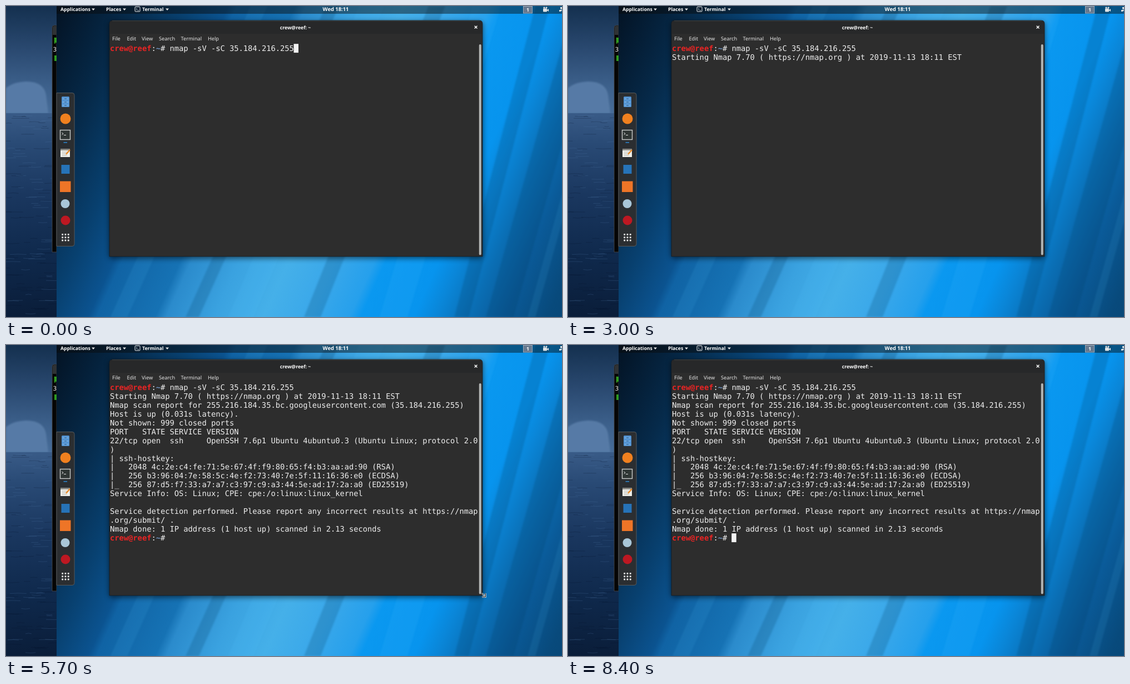
An HTML page that plays this animation: 1000x560 px, repeating every 8500 ms.

```html
<!DOCTYPE html>
<html lang="en">
<head>
<meta charset="utf-8">
<title>Terminal port scan</title>
<style>
html, body { margin: 0; width: 100%; height: 100%; overflow: hidden; background: #000; }
svg { display: block; width: 1000px; height: 560px; }
text { white-space: pre; text-rendering: geometricPrecision; }
.ui { font: 9.2px "Noto Sans", "Open Sans", sans-serif; fill: #e6e6e6; }
.bar { font: bold 8.7px "Noto Sans", "Open Sans", sans-serif; fill: #fff; }
.term { font: 13.74px "DejaVu Sans Mono", monospace; fill: #efefef; }
.host { font-weight: bold; fill: #ec2424; }
.dir { font-weight: bold; fill: #6f93c4; }
</style>
</head>
<body>
<svg id="stage" viewBox="0 0 1000 560" xmlns="http://www.w3.org/2000/svg">
  <defs>
    <linearGradient id="sky" x2="0" y2="1">
      <stop offset="0" stop-color="#14304f"/><stop offset=".4" stop-color="#2a4970"/>
      <stop offset=".75" stop-color="#3d618c"/><stop offset="1" stop-color="#476c98"/>
    </linearGradient>
    <linearGradient id="sea" x2="0" y2="1">
      <stop offset="0" stop-color="#395b87"/><stop offset=".15" stop-color="#294a75"/>
      <stop offset=".4" stop-color="#1a375f"/><stop offset=".7" stop-color="#0f294c"/>
      <stop offset="1" stop-color="#0a1d39"/>
    </linearGradient>
    <linearGradient id="wall" gradientUnits="userSpaceOnUse"></linearGradient>
    <radialGradient id="corner" gradientUnits="userSpaceOnUse" r="1"
      gradientTransform="translate(91 0) scale(740 340)">
      <stop offset="0"/><stop offset=".25" stop-opacity=".96"/>
      <stop offset=".5" stop-opacity=".68"/><stop offset=".75" stop-opacity=".3"/>
      <stop offset="1" stop-opacity="0"/>
    </radialGradient>
    <filter id="soft"><feGaussianBlur stdDeviation="1.5"/></filter>
    <filter id="shade" x="-5%" y="-5%" width="110%" height="112%"><feGaussianBlur stdDeviation="5"/></filter>
    <clipPath id="desk"><rect x="91" width="909" height="560"/></clipPath>
  </defs>

  <!-- desktop behind -->
  <rect width="92" height="194" fill="url(#sky)"/>
  <path d="M0 193V148Q12 137 36 136Q68 136 72 160L76 193Z" fill="#567aa6" filter="url(#soft)"/>
  <rect y="193" width="92" height="367" fill="url(#sea)"/>
  <g id="waves"></g>
  <path d="M91 35H87Q83 35 83 39V443H91Z" fill="#050505" stroke="#4a4a4a" stroke-width=".8"/>
  <path d="M91 36H87Q84 36 84 39V52H91Z" fill="#303234"/>
  <text class="term" x="84" y="66" style="fill:#42b82c;font-size:12px">[</text>
  <rect x="88" y="57" width="3" height="9" fill="#2f9a20"/>
  <text class="term" x="84.5" y="82" style="font-size:11px">3</text>
  <path d="M87 89h4v10h-4z" fill="#2f9a20"/>

  <!-- wallpaper -->
  <g clip-path="url(#desk)">
    <rect x="91" width="909" height="560" fill="url(#wall)"/>
    <g id="bands" filter="url(#soft)"></g>
    <rect x="91" width="909" height="560" fill="url(#corner)"/>
  </g>

  <!-- top panel -->
  <rect x="91" width="909" height="14" fill="#0a0a0a" opacity=".45"/>
  <g id="panel"></g>
  <g fill="none" stroke="#eee">
    <rect x="232" y="1.5" width="9" height="8.5" rx="1"/>
    <path d="M234 4l2 1.7-2 1.7M236.5 8h2.5" stroke-width=".8"/>
  </g>
  <rect x="930.5" y=".5" width="16" height="12.5" fill="#66798f" stroke="#9aa9b9"/>
  <text class="bar" x="938.5" y="9.5" text-anchor="middle">1</text>
  <g fill="#dfe3e6">
    <rect x="966" y="4.5" width="7" height="6" rx="1"/>
    <circle cx="968" cy="3" r="1.6"/><circle cx="972" cy="3" r="1.6"/>
    <path d="M973 7l3-2v5l-3-2z"/>
    <path d="M997 2h3v3h-3zM995 7h3v3h-3zM998 5h1v3h2v1h-3z"/>
  </g>

  <!-- dock -->
  <path d="M91 156.5H119Q123 156.5 123 160.5V428.5Q123 432.5 119 432.5H91Z" fill="#2b2e31" stroke="#55595c"/>
  <rect x="100" y="163" width="14" height="19" rx="1.5" fill="#4d8fd0"/>
  <path d="M101.5 165h11v4h-11zM101.5 171h11v4h-11zM101.5 177h11v4h-11z" fill="#68a3da"/>
  <path d="M105 167h4M105 173h4M105 179h4" stroke="#23568c"/>
  <circle cx="107" cy="203" r="9.5" fill="#f0801f"/>
  <rect x="97.5" y="223.5" width="18" height="17" fill="#2f3634" stroke="#c9ccca" stroke-width="1.4"/>
  <path d="M100.5 228l2.5 2-2.5 2M104 232.5h4" fill="none" stroke="#e8e8e8"/>
  <rect x="103.5" y="245" width="6.5" height="1.6" fill="#2a84cc"/>
  <path d="M98 259h17v13H98z" fill="#efefea"/>
  <path d="M98 257h17v3H98z" fill="#8b8b86"/>
  <path d="M100.5 263h10M100.5 266h8M100.5 269h9" stroke="#b5b5b0"/>
  <path d="M108 267l7-8" stroke="#e98a28" stroke-width="2.4"/>
  <rect x="99.5" y="286" width="15" height="16" fill="#2673b8"/>
  <rect x="97" y="315.5" width="19.5" height="19.5" fill="#ee7527"/>
  <circle cx="106.5" cy="356" r="8" fill="#a9c6d8"/>
  <circle cx="107" cy="386" r="8.5" fill="#bd1822"/>
  <g id="dots" fill="#e8e8e8"></g>

  <!-- terminal window -->
  <rect x="185" y="28" width="673" height="427" rx="6" fill="#000" opacity=".5" filter="url(#shade)"/>
  <path d="M186 451V32Q186 26 192 26H851Q857 26 857 32V451Z" fill="#2d2d2d" stroke="#151b20" stroke-width=".8"/>
  <path d="M186.5 50V32.5Q186.5 26.5 192.5 26.5H850.5Q856.5 26.5 856.5 32.5V50Z" fill="#272829"/>
  <path d="M191 26.7H852" stroke="#47494a" stroke-width=".8"/>
  <text class="bar" x="520.5" y="41.8" text-anchor="middle">crew@reef: ~</text>
  <path d="M842.7 35.7l4.8 4.8m0-4.8l-4.8 4.8" stroke="#fff" stroke-width="1.4"/>
  <rect x="850.8" y="69" width="4" height="379.5" rx="2" fill="#b3b5b4"/>
  <g id="menu"></g>
  <g id="command"></g>
  <g id="start"></g>
  <g id="report"></g>
  <rect id="cursor" width="8.5" height="15.9" fill="#f2f2f2"/>
  <g id="beam" fill="none" stroke="#e8e8e8"><path d="M-1.5 .5H1.5M0 .5V11M-1.5 11H1.5"/></g>
  <g id="arrow"><path d="M.5 .5V8.5L2.4 6.9 3.7 9.6 5 9 3.8 6.3H6.5Z" fill="#080808" stroke="#fff" stroke-width=".8"/></g>
  <g id="resize" fill="none">
    <path d="M1 1L6 6M7.5 1V7.5H1" stroke="#f4f4f4" stroke-width="2.4"/>
    <path d="M1 1L6 6M7.5 1V7.5H1" stroke="#151515"/>
  </g>
</svg>
<script>
const LOOP = 8500, COL = 8.27, ROW = 15.94, LEFT = 187, TOP = 68.2;
const $ = id => document.getElementById(id);

function add(parent, tag, attrs, content = "") {
  const el = document.createElementNS("http://www.w3.org/2000/svg", tag);
  for (const key in attrs) el.setAttribute(key, attrs[key]);
  el.textContent = content;
  $(parent).append(el);
  return el;
}

function line(parent, row, str, col = 0, cls = "") {
  add(parent, "text", { class: "term " + cls, x: LEFT + col * COL, y: TOP + row * ROW + 12.8 }, str);
}

function prompt(parent, row, command) {
  line(parent, row, "crew@reef", 0, "host");
  line(parent, row, ":", 9);
  line(parent, row, "~", 10, "dir");
  line(parent, row, "# " + command, 11);
}

// Slanted wallpaper: x on the line y = BASE, colour
const SLANT = 0.45, BASE = 500, FROM = -150, SPAN = 1250;
[[-150, "#03101f"], [0, "#062a4a"], [100, "#08406f"], [175, "#0b5390"], [190, "#1063a4"],
 [295, "#1672b4"], [315, "#2b8bcc"], [400, "#3aa2e0"], [490, "#45b0e9"], [570, "#3aa8ea"],
 [645, "#26a0ec"], [665, "#0a98f0"], [760, "#0794ee"], [800, "#0a86d8"], [860, "#0a6eb4"],
 [920, "#0a5a98"], [1000, "#084a7c"], [1100, "#07426f"]].forEach(([x, color]) =>
  add("wall", "stop", { offset: (x - FROM) / SPAN, "stop-color": color }));
const run = SPAN / (1 + SLANT * SLANT);
const axis = { x1: FROM, y1: BASE, x2: FROM + run, y2: BASE + run * SLANT };
for (const key in axis) $("wall").setAttribute(key, axis[key]);

// Rays: x on y = BASE, width, slant, light or dark
[[215, 30, 0.45, 1], [350, 24, 0.45, 0], [425, 45, 0.42, 1], [560, 30, 0.4, 0], [690, 50, 0.3, 1],
 [822, 26, 0.26, 0], [880, 50, 0.28, 0], [955, 14, 0.28, 1]].forEach(([x, w, slant, light]) => {
  const a = x + slant * BASE, b = x - slant * (560 - BASE);
  add("bands", "path", {
    d: `M${a} 0H${a + w}L${b + w} 560H${b}Z`,
    fill: light ? "#55bfff" : "#003766", opacity: light ? 0.1 : 0.2
  });
});

// Seeded ripples
let seed = 7;
const rnd = () => (seed = seed * 16807 % 2147483647) / 2147483647;
for (let i = 0; i < 110; i++) {
  const y = 198 + rnd() * 360, w = 8 + rnd() * 24;
  add("waves", "path", {
    d: `M${rnd() * 88 - 8} ${y}q${w / 2} ${rnd() * 4 - 2} ${w} 0`,
    fill: "none", stroke: rnd() > 0.5 ? "#527aa6" : "#041329", opacity: 0.25
  });
}

[["Applications", 98, 157], ["Places", 180, 213], ["Terminal", 245, 290]].forEach(([s, x, tri]) => {
  add("panel", "text", { class: "bar", x, y: 9 }, s);
  add("panel", "path", { d: `M${tri - 3} 4.5h6l-3 3.5z`, fill: "#eee" });
});
add("panel", "text", { class: "bar", x: 593, y: 9.3, "text-anchor": "middle", style: "font-size:9.4px" }, "Wed 18:11");

[["File", 191], ["Edit", 217.5], ["View", 244], ["Search", 275], ["Terminal", 314.5], ["Help", 363]]
  .forEach(([s, x]) => add("menu", "text", { class: "ui", x, y: 62.3 }, s));

for (let i = 0; i < 9; i++)
  add("dots", "rect", { x: 100.2 + i % 3 * 5.3, y: 410 + Math.floor(i / 3) * 5.3, width: 2.9, height: 2.9, rx: 0.8 });

prompt("command", 0, "nmap -sV -sC 35.184.216.255");
line("start", 1, "Starting Nmap 7.70 ( https://nmap.org ) at 2019-11-13 18:11 EST");
`Nmap scan report for 255.216.184.35.bc.googleusercontent.com (35.184.216.255)
Host is up (0.031s latency).
Not shown: 999 closed ports
PORT   STATE SERVICE VERSION
22/tcp open  ssh     OpenSSH 7.6p1 Ubuntu 4ubuntu0.3 (Ubuntu Linux; protocol 2.0
)
| ssh-hostkey:
|   2048 4c:2e:c4:fe:71:5e:67:4f:f9:80:65:f4:b3:aa:ad:90 (RSA)
|   256 b3:96:04:7e:58:5c:4e:f2:73:40:7e:5f:11:16:36:e0 (ECDSA)
|_  256 87:d5:f7:33:a7:a7:c3:97:c9:a3:44:5e:ad:17:2a:a0 (ED25519)
Service Info: OS: Linux; CPE: cpe:/o:linux:linux_kernel

Service detection performed. Please report any incorrect results at https://nmap
.org/submit/ .
Nmap done: 1 IP address (1 host up) scanned in 2.13 seconds`
  .split("\n").forEach((s, i) => line("report", i + 2, s));
prompt("report", 17, "");

// Pointer steps: start time, shape, x, y
const STEPS = [
  [0], [5400, "beam", 639.5, 174], [5550, "arrow", 873, 396], [5700, "resize", 855, 446],
  [6000, "arrow", 792, 507], [6150, "arrow", 817, 527], [6300, "arrow", 866, 551],
  [6450, "arrow", 924, 539], [6600]
];

const show = (id, on) => $(id).setAttribute("visibility", on ? "visible" : "hidden");

function draw(t) {
  show("start", t >= 1200);
  show("report", t >= 3300);
  const [col, row] = t < 1200 ? [40, 0] : t < 3300 ? [0, 2] : [13, 17];
  $("cursor").setAttribute("x", LEFT + col * COL - 0.3);
  $("cursor").setAttribute("y", TOP + row * ROW);
  show("cursor", Math.floor(t / 600) % 2 === 0);

  const [, shape, x, y] = STEPS.filter(s => s[0] <= t).pop();
  for (const id of ["beam", "arrow", "resize"]) show(id, id === shape);
  if (shape) $(shape).setAttribute("transform", `translate(${x} ${y})`);
}

const begin = performance.now();
function tick() {
  draw((performance.now() - begin) % LOOP);
  requestAnimationFrame(tick);
}
draw(0);
requestAnimationFrame(tick);
</script>
</body>
</html>
```
